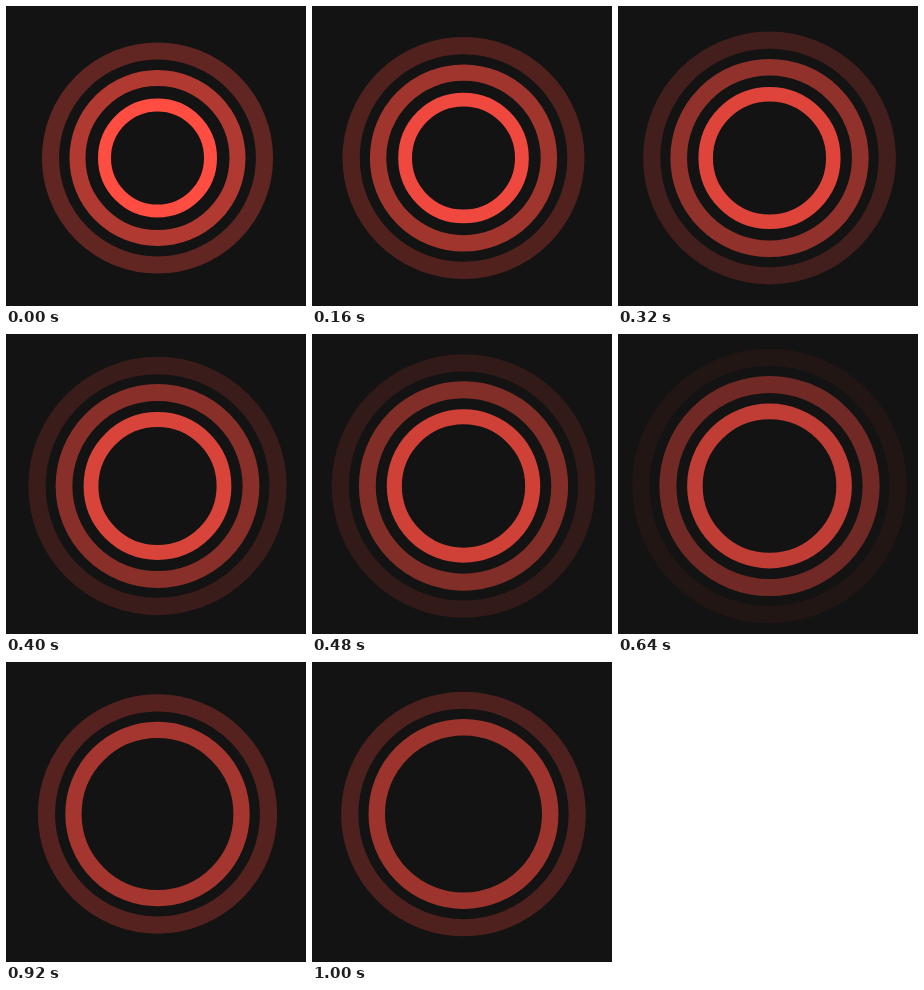
Animation of 300 by 300 pixels, one loop 1040 ms. Source, as an HTML page with a canvas:

```html
<!DOCTYPE html>
<html lang="en">
<head>
<meta charset="utf-8">
<title>Pulse rings</title>
<style>
  html, body { margin: 0; width: 100%; height: 100%; overflow: hidden; background: #131313; }
  canvas { display: block; }
</style>
</head>
<body>
<canvas id="stage" width="300" height="300"></canvas>
<script>
const ctx = document.getElementById('stage').getContext('2d');
const LOOP = 1040, STEP = 40;
const GAP = 800;       // time between two rings
const LIFE = 3 * GAP;  // time until a ring has faded out

// Radius grows steadily, the line thickens with an ease-out, opacity falls linearly.
function drawRing(age) {
  const p = age / LIFE;
  if (p >= 1) return;
  ctx.globalAlpha = 1 - p;
  ctx.lineWidth = 17.3 - 4.3 * (1 - p) ** 3;
  ctx.beginPath();
  ctx.arc(151.5, 152, 53 + 81 * p, 0, 2 * Math.PI);
  ctx.stroke();
}

function draw(time) {
  const t = Math.floor((time + 1) / STEP) * STEP % LOOP;
  ctx.clearRect(0, 0, 300, 300);
  ctx.strokeStyle = '#ff4d42';
  for (let i = 0; i < 3; i++) drawRing(t + i * GAP);
}

const start = performance.now();
function tick() {
  draw(performance.now() - start);
  requestAnimationFrame(tick);
}
tick();
</script>
</body>
</html>
```
